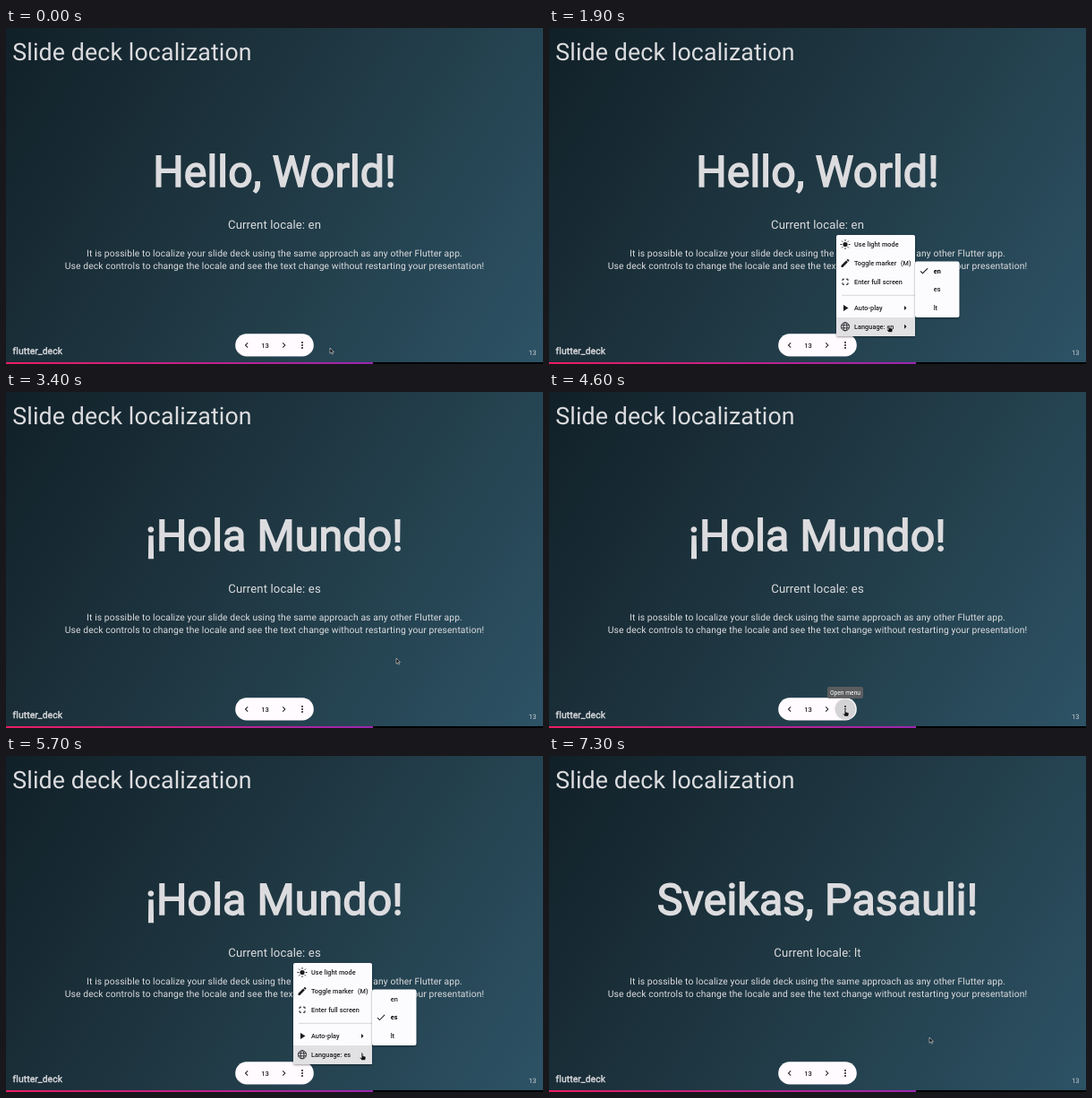
An HTML page that plays this animation: 600x375 px, repeating every 9000 ms.

```html
<!DOCTYPE html>
<html lang="en">
<head>
<meta charset="utf-8">
<title>Slide deck localization</title>
<style>
  html, body { margin: 0; height: 100%; overflow: hidden; background: #0f2027; }
  svg { display: block; width: 600px; height: 375px; font-family: Roboto, sans-serif; }
  .slide { fill: #dcdcdf; letter-spacing: .118px; text-rendering: geometricPrecision; }
  .mid { text-anchor: middle; }
  .fake-bold { stroke: #dcdcdf; stroke-width: .4; }
  .panel { fill: #fcfcff; filter: drop-shadow(0 1px 1px rgba(0, 0, 0, .4)); }
  .menu text, .bar text { font-size: 7.3px; font-weight: 500; letter-spacing: .05px; fill: #1b1b1f; }
  .menu .picked { font-weight: 700; fill: #000; }
  .icon { fill: #1b1b1f; }
</style>
</head>
<body>
<svg viewBox="0 0 600 375">
  <defs>
    <linearGradient id="sky" gradientUnits="userSpaceOnUse" x2="600" y2="375">
      <stop stop-color="#112028"/><stop offset=".5" stop-color="#203944"/><stop offset="1" stop-color="#2d5366"/>
    </linearGradient>
    <linearGradient id="progress"><stop stop-color="#e91e63"/><stop offset="1" stop-color="#9c27b0"/></linearGradient>
  </defs>
  <rect width="600" height="375" fill="url(#sky)"/>

  <g class="slide">
    <text x="7.3" y="35.5" font-size="26.75">Slide deck localization</text>
    <text id="hello" class="mid fake-bold" x="300" y="176.8" font-size="48.3" style="stroke-width:1.5"></text>
    <text id="locale" class="mid" x="300" y="224" font-size="13.15"></text>
    <g class="mid" font-size="10.31">
      <text x="300" y="254.6">It is possible to localize your slide deck using the same approach as any other Flutter app.</text>
      <text x="300" y="269.3">Use deck controls to change the locale and see the text change without restarting your presentation!</text>
    </g>
    <text class="fake-bold" x="7.6" y="363.6" font-size="10.31">flutter_deck</text>
    <text x="592.7" y="364.6" font-size="7.5" text-anchor="end" opacity=".9">13</text>
  </g>
  <rect y="373" width="600" height="2"/>
  <rect y="373" width="410" height="2" fill="url(#progress)"/>

  <g class="bar">
    <rect x="256.2" y="341.3" width="87.6" height="25.2" rx="12.6" fill="#fffbff"/>
    <circle id="buttonHover" cx="331" cy="354" r="11.5" fill="#d3d3d6"/>
    <text class="mid" x="289.6" y="356.7" style="font-size:7.6px">13</text>
    <g id="barIcons" class="icon"></g>
  </g>

  <g id="menu" class="menu">
    <rect class="panel" x="321" y="231" width="88" height="113" rx="2"/>
    <rect id="rowHover" x="321" width="88" height="21" fill="#e1e1e4"/>
    <path d="M327 298.3h82" stroke="#c6c6ca" stroke-width=".7"/>
    <g id="menuIcons" class="icon"></g>
    <text x="341" y="244.1">Use light mode</text>
    <text x="341" y="265">Toggle marker</text><text x="393" y="265">(M)</text>
    <text x="341" y="285.8">Enter full screen</text>
    <text x="341" y="315.1">Auto-play</text>
    <text id="language" x="341" y="335.9"></text>
  </g>
  <g id="submenu" class="menu">
    <rect class="panel" x="409" y="260.5" width="49.5" height="62.5" rx="2"/>
    <rect id="subHover" x="409" width="49.5" height="20.9" fill="#cacacc"/>
    <g id="options"></g>
    <g id="check" class="icon"></g>
  </g>

  <g id="tooltip">
    <rect x="311" y="329" width="40" height="13" rx="2" fill="#616161" fill-opacity=".9"/>
    <text class="mid" x="331" y="338" font-size="6.7" fill="#fff">Open menu</text>
  </g>
  <circle id="ring" fill="#000" fill-opacity=".06" stroke="#111" stroke-width=".9"/>
  <g id="cursor" fill="#111" stroke="#fff" stroke-width=".5" stroke-linejoin="round">
    <path id="arrow" d="M0 0V6.3L1.5 5 2.5 7.2 3.5 6.7 2.5 4.6H4.4Z"/>
    <path id="hand" d="M-.8 .2Q0 -.6 .7 .2V2.6L3.6 3.4Q4.3 3.7 4 5L3.4 7.6H-.5L-2.8 4.8Q-2.6 3.7 -.8 4.9Z"/>
  </g>
</svg>
<script>
const $ = id => document.getElementById(id);
const LOOP = 9000, STEP = 100;
const CODES = ['en', 'es', 'lt'];
const HELLO = ['Hello, World!', '¡Hola Mundo!', 'Sveikas, Pasauli!'];
const CLICKS = [900, 2800, 4700, 6600];
// [time, x, y] of the pointer tip
const POINTER = [
  [0, 362, 357], [200, 362, 357], [900, 331, 354.5], [1200, 331, 354.5], [1700, 358, 335],
  [2100, 402, 329], [2600, 436, 297], [3600, 436, 297], [4400, 331, 354.5], [4800, 331, 354.5],
  [5200, 349.5, 338], [5600, 398, 332], [5700, 398, 332], [6000, 425, 314], [LOOP, 425, 314]
];

const icon = (x, y, d, attrs = '') =>
  `<path transform="translate(${x} ${y}) scale(.5) translate(-12 -12)" d="${d}" ${attrs}/>`;
const caret = 'M10 17l5-5-5-5z';
const line = 'fill="none" stroke="#1b1b1f" stroke-width="2"';
const rays = Array.from({ length: 8 }, (_, i) => {
  const c = Math.cos(i * Math.PI / 4), s = Math.sin(i * Math.PI / 4);
  return `M${12 + 7.5 * c} ${12 + 7.5 * s}L${12 + 11 * c} ${12 + 11 * s}`;
}).join('');

$('barIcons').innerHTML =
  icon(268.8, 354, 'M15.4 7.4 14 6l-6 6 6 6 1.4-1.4L10.8 12z') +
  icon(310.5, 354, 'M10 6 8.6 7.4 13.2 12l-4.6 4.6L10 18l6-6z') +
  [-3, 0, 3].map(d => `<circle cx="331" cy="${354 + d}" r="1"/>`).join('');
$('menuIcons').innerHTML =
  '<circle cx="331" cy="241.5" r="2.6"/>' + icon(331, 241.5, rays, line) +
  icon(331, 262.4, 'M3 17.25V21h3.75L17.8 9.94l-3.75-3.75zM20.7 7.04a1 1 0 0 0 0-1.41l-2.34-2.34a1 1 0 0 0-1.41 0l-1.83 1.83 3.75 3.75z') +
  icon(331, 283.2, 'M6 10V6h4M14 6h4v4M18 14v4h-4M10 18H6v-4', line) +
  icon(331, 312.5, 'M8 5v14l11-7z') +
  icon(331, 333.3, 'M2.8 12a9.2 9.2 0 1 0 18.4 0a9.2 9.2 0 1 0-18.4 0M8 12a4 9.2 0 1 0 8 0a4 9.2 0 1 0-8 0M3.5 9h17M3.5 15h17', line.replace('"2"', '"1.7"')) +
  icon(398, 312.5, caret) + icon(398, 333.3, caret);
$('check').innerHTML = icon(419, 0, 'M9 16.2 4.8 12l-1.4 1.4L9 19 21 7l-1.4-1.4z');
$('options').innerHTML = CODES.map((c, i) => `<text x="429.7" y="${273.6 + 20.8 * i}">${c}</text>`).join('');

const show = (id, on) => $(id).style.display = on ? '' : 'none';
const between = (v, a, b) => v >= a && v < b;

function pointerAt(t) {
  const i = POINTER.findIndex(p => p[0] > t);
  const [t0, x0, y0] = POINTER[i - 1], [t1, x1, y1] = POINTER[i];
  const u = (t - t0) / (t1 - t0), k = u * u * (3 - 2 * u);
  return [x0 + (x1 - x0) * k, y0 + (y1 - y0) * k];
}

function draw(t) {
  const [x, y] = pointerAt(t);
  const lang = t < 3000 ? 0 : t < 6800 ? 1 : 2;
  const menu = between(t, 1100, 3000) || between(t, 4900, 6800);
  const submenu = between(t, 1700, 3000) || between(t, 5100, 6800);

  $('hello').textContent = HELLO[lang];
  $('locale').textContent = 'Current locale: ' + CODES[lang];
  $('language').textContent = 'Language: ' + CODES[lang];
  [...$('options').children].forEach((o, i) => o.setAttribute('class', i === lang ? 'picked' : ''));
  $('check').setAttribute('transform', `translate(0 ${271 + 20.8 * lang})`);

  const onButton = Math.hypot(x - 331, y - 354) < 11.5;
  const onRow = menu && between(x, 321, 409) && between(y, 302, 344);
  const onOption = submenu && between(x, 409, 459) && between(y, 260.5, 323);
  show('menu', menu);
  show('submenu', submenu);
  show('buttonHover', onButton);
  show('rowHover', onRow);
  show('subHover', onOption);
  $('rowHover').setAttribute('y', y < 323 ? 302 : 323);
  $('subHover').setAttribute('y', 260.5 + 20.8 * Math.min(2, Math.max(0, Math.floor((y - 260.5) / 20.8))));

  $('tooltip').style.opacity = between(t, 4500, 5400) ? Math.min(1, (5500 - t) / 400) : 0;

  const click = CLICKS.find(c => between(t, c, c + 200));
  show('ring', click !== undefined);
  if (click !== undefined) {
    const age = (t - click) / 200;
    $('ring').setAttribute('cx', x);
    $('ring').setAttribute('cy', y);
    $('ring').setAttribute('r', 12.5 + age);
    $('ring').style.opacity = 1 - age;
  }

  const hand = onButton || onRow || onOption;
  show('hand', hand);
  show('arrow', !hand);
  $('cursor').setAttribute('transform', `translate(${x} ${y})`);
}

function tick() {
  draw(Math.floor(performance.now() % LOOP / STEP) * STEP);
  requestAnimationFrame(tick);
}
tick();
</script>
</body>
</html>
```
